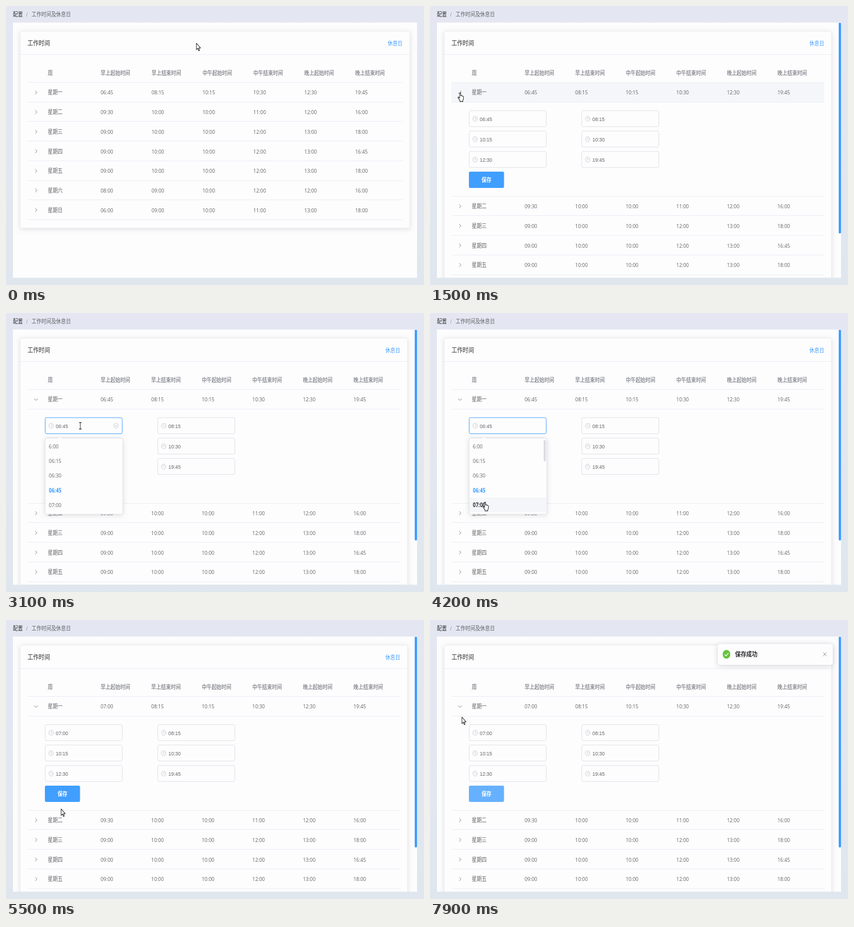
Recreate the animation shown at these times as an HTML page with a canvas. Size 720 by 480 pixels, loop 8000 ms.

```html
<!DOCTYPE html>
<html lang="zh-CN">
<head>
<meta charset="utf-8">
<style>
html, body { margin: 0; width: 100%; height: 100%; overflow: hidden; background: #e2e7f0 }
canvas { display: block }
</style>
</head>
<body>
<canvas id="stage" width="720" height="480"></canvas>
<script>
const ctx = document.getElementById('stage').getContext('2d');
const LOOP = 8000;
// The page is shown at 60.5% width and 70% height, text and cursors included.
const SX = 0.605, SY = 0.7;
const UI = '"Open Sans", "Noto Sans CJK SC", "Noto Sans CJK", sans-serif';
const FIELD = '"Liberation Sans", Arial, sans-serif';
const BLUE = '#409eff', INK = '#606266', DARK = '#303133', GREY = '#909399', PALE = '#c0c4cc';
const WHITE = '#fefdfe', LINE = '#ebeef5', HOVER = '#f4f6fa';

const EXPAND = 1400, OPEN = 2800, PICK = 4450, SAVE = 6600, NOTE = 6900;
const ROW = 33.7, TOP = 131.5, DETAIL = 162;

const heads = ['早上起始时间', '早上结束时间', '中午起始时间', '中午结束时间', '晚上起始时间', '晚上结束时间'];
const days = [
  '一 06:45 08:15 10:15 10:30 12:30 19:45',
  '二 09:30 10:00 10:00 11:00 12:00 16:00',
  '三 09:00 10:00 10:00 12:00 13:00 18:00',
  '四 09:00 10:00 10:00 12:00 13:00 16:45',
  '五 09:00 10:00 10:00 12:00 13:00 18:00',
  '六 08:00 09:00 10:00 12:00 12:00 16:00',
  '日 06:00 09:00 10:00 11:00 13:00 18:00'
].map(s => s.split(' '));
const options = ['6:00', '06:15', '06:30', '06:45', '07:00'];

// time, x, y of the pointer
const path = [
  [0, 328, 64], [100, 328, 64], [1100, 52, 149], [1650, 52, 149], [2600, 128, 194],
  [3200, 128, 194], [4000, 95, 325], [5500, 95, 325], [6300, 99, 300],
  [6750, 99, 300], [7150, 185, 300], [7600, 185, 300], [7900, 55, 167], [LOOP, 55, 167]
];
const arrow = new Path2D('M0 0V16L4 12.6L6.5 18.5L9 17.4L6.6 11.7H11.6Z');
const hand = new Path2D('M5.5 1.5Q7-.5 8.5 1.5V7.5Q10 6 11.2 8Q13 7 14 9Q16 8.5 16.5 10.5V14Q16.5 17 14.5 19V22H6.5V19.5L1 13Q0 10.5 2.5 11L5.5 13.5Z');
const beam = new Path2D('M-3.5-8H-1L0-7L1-8H3.5M0-7V7M-3.5 8H-1L0 7L1 8H3.5');

const clamp = v => Math.max(0, Math.min(1, v));
const smooth = p => p * p * (3 - 2 * p);
const easeOut = p => 1 - Math.pow(1 - clamp(p), 4);
const within = (p, x, y, w, h) => p.x >= x && p.x < x + w && p.y >= y && p.y < y + h;

function pointer(t) {
  const i = path.findIndex(k => k[0] > t);
  const [t0, x0, y0] = path[i - 1], [t1, x1, y1] = path[i];
  const p = smooth((t - t0) / (t1 - t0));
  return { x: x0 + (x1 - x0) * p, y: y0 + (y1 - y0) * p };
}

function text(str, x, y, color, { size = 14, weight = '', font = UI, align = 'left' } = {}) {
  ctx.save();
  ctx.translate(x, y + size * SY * 0.37);
  ctx.scale(SX, SY);
  ctx.font = `${weight} ${size}px ${font}`;
  ctx.textAlign = align;
  ctx.fillStyle = color;
  ctx.fillText(str, 0, 0);
  ctx.restore();
}

function box(x, y, w, h, r, fill, border, shadow) {
  ctx.save();
  ctx.beginPath();
  ctx.roundRect(x, y, w, h, r);
  if (shadow) {
    ctx.shadowColor = `rgba(0,0,0,${shadow})`;
    ctx.shadowBlur = 8;
    ctx.shadowOffsetY = 1.4;
  }
  ctx.fillStyle = fill;
  ctx.fill();
  ctx.shadowColor = 'transparent';
  if (border) {
    ctx.lineWidth = 0.9;
    ctx.strokeStyle = border;
    ctx.stroke();
  }
  ctx.restore();
}

function rect(x, y, w, h, fill) {
  ctx.fillStyle = fill;
  ctx.fillRect(x, y, w, h);
}

function stroke(color, width, ...points) {
  ctx.beginPath();
  points.forEach(([x, y], i) => i ? ctx.lineTo(x, y) : ctx.moveTo(x, y));
  ctx.strokeStyle = color;
  ctx.lineWidth = width;
  ctx.stroke();
}

function ring(x, y, color) {
  ctx.beginPath();
  ctx.ellipse(x, y, 3.7, 4.2, 0, 0, 7);
  ctx.strokeStyle = color;
  ctx.lineWidth = 0.8;
  ctx.stroke();
}

function cross(x, y, rx, ry, color) {
  stroke(color, 0.9, [x - rx, y - ry], [x + rx, y + ry]);
  stroke(color, 0.9, [x - rx, y + ry], [x + rx, y - ry]);
}

function chevron(x, y, turn) {
  ctx.save();
  ctx.translate(x, y);
  ctx.rotate(turn * Math.PI / 2);
  stroke('#7d8087', 0.9, [-1.4, -3.1], [1.5, 0], [-1.4, 3.1]);
  ctx.restore();
}

function field(i, value, focus, m) {
  const x = i % 2 ? 261.5 : 67.5, y = 180 + 35.1 * (i >> 1);
  const over = within(m, x, y, 133, 28);
  box(x, y, 132.7, 27.7, 2.5, WHITE, focus ? BLUE : over ? PALE : '#dcdfe6');
  ring(x + 10.2, y + 14, PALE);
  stroke(PALE, 0.8, [x + 10.2, y + 11.4], [x + 10.2, y + 14.4], [x + 12.2, y + 14.4]);
  text(value, x + 18.3, y + 14, INK, { font: FIELD });
  if (over && i === 0) {
    ring(x + 122, y + 14, PALE);
    cross(x + 122, y + 14, 1.3, 1.5, PALE);
  }
}

function detail(t, m, values) {
  values.forEach((v, i) => field(i, v, i === 0 && t >= OPEN && t < PICK, m));
  const lit = t >= SAVE || within(m, 67, 285, 60.5, 28);
  box(67, 285, 60.5, 28, 2.3, lit ? '#66b1ff' : BLUE);
  text('保存', 97.3, 299, '#fff', { weight: 'bold', align: 'center' });
}

function table(t, m, expanded, right) {
  const step = expanded ? 87.1 : 87.7;
  const colX = i => 163 + step * i;
  text('周', 72, 115, GREY, { weight: 'bold' });
  heads.forEach((h, i) => text(h, colX(i), 115, GREY, { weight: 'bold' }));
  rect(37, 131, right - 37, 1, LINE);
  days.forEach(([day, ...times], r) => {
    const y = TOP + ROW * r + (expanded && r ? DETAIL : 0);
    if (t >= PICK && r === 0) times[0] = '07:00';
    const covered = t >= OPEN && t < PICK;
    if (!covered && within(m, 37, y, right - 37, ROW)) rect(37, y, right - 37, ROW, HOVER);
    const mid = y + 17.3;
    chevron(51.8, mid, r ? 0 : smooth(clamp((t - EXPAND) / 200)));
    text('星期' + day, 72, mid, INK);
    times.forEach((v, i) => text(v, colX(i), mid, INK));
    rect(37, Math.floor(y + ROW), right - 37, 1, LINE);
    if (expanded && r === 0) {
      rect(37, 327, right - 37, 1, LINE);
      detail(t, m, times);
    }
  });
}

function dropdown(t, m) {
  const shown = t < PICK ? easeOut((t - OPEN) / 300) : 1 - easeOut((t - PICK) / 300);
  if (t < OPEN || shown <= 0.002) return;
  ctx.save();
  ctx.globalAlpha = shown;
  ctx.translate(0, 215.5);
  ctx.scale(1, shown);
  ctx.translate(0, -215.5);
  box(67.5, 215.5, 133.5, 130.5, 2.5, WHITE, '#e4e7ed', 0.14);
  ctx.beginPath();
  ctx.moveTo(88.5, 216.2);
  ctx.lineTo(92.5, 212);
  ctx.lineTo(96.5, 216.2);
  ctx.fillStyle = WHITE;
  ctx.fill();
  stroke('#e4e7ed', 0.7, [88.5, 215.5], [92.5, 212], [96.5, 215.5]);
  options.forEach((o, i) => {
    const y = 216.7 + 25.2 * i;
    const over = within(m, 68, y, 133, 25.2);
    const selected = o === (t < PICK ? '06:45' : '07:00');
    if (over) rect(68, y, 132.5, 25.2, HOVER);
    text(o, 73.8, y + 12.6, selected ? BLUE : over ? DARK : INK, { weight: selected || over ? 'bold' : '' });
  });
  if (within(m, 68, 216, 133, 130)) box(195.8, 218.5, 3.7, 37, 1.8, '#dcdde0');
  ctx.restore();
}

function notice(t) {
  if (t < NOTE) return;
  ctx.save();
  ctx.translate(225 * (1 - easeOut((t - NOTE) / 300)), 0);
  box(495.5, 41, 198.5, 36.3, 4, WHITE, LINE, 0.16);
  ctx.beginPath();
  ctx.ellipse(510.7, 59, 6.6, 7.4, 0, 0, 7);
  ctx.fillStyle = '#67c23a';
  ctx.fill();
  stroke('#fff', 1.3, [507.6, 59.2], [509.9, 61.8], [514, 56.8]);
  text('保存成功', 525.5, 59, DARK, { size: 16, weight: 'bold' });
  cross(680, 59, 2.9, 3.3, GREY);
  ctx.restore();
}

function cursor(t, m) {
  const listOpen = t >= OPEN && t < PICK;
  const overField = [0, 1, 2, 3, 4, 5].some(i =>
    within(m, i % 2 ? 261 : 67, 180 + 35.1 * (i >> 1), 133, 28));
  const overHand = within(m, 67, 285, 60.5, 28) || within(m, 46, 142, 12, 14) ||
    (listOpen && within(m, 67, 215, 134, 131));
  ctx.save();
  ctx.translate(m.x, m.y);
  ctx.scale(SX, SY);
  ctx.lineJoin = 'round';
  ctx.lineWidth = 1.5;
  ctx.strokeStyle = '#222';
  ctx.fillStyle = '#fff';
  if (overHand) {
    ctx.translate(-7, 0);
    ctx.fill(hand);
    ctx.stroke(hand);
  } else if (overField && t > EXPAND) {
    ctx.stroke(beam);
  } else {
    ctx.fill(arrow);
    ctx.stroke(arrow);
  }
  ctx.restore();
}

function draw(t) {
  const m = pointer(t), expanded = t >= EXPAND;
  const cardRight = expanded ? 691.5 : 695.5, right = cardRight - 12.5;

  const bg = ctx.createLinearGradient(0, 0, 0, 480);
  bg.addColorStop(0, '#e4e7f2');
  bg.addColorStop(1, '#e0e6ee');
  rect(0, 0, 720, 480, bg);
  text('配置', 12, 14, DARK, { weight: '500' });
  text('/', 34.5, 14, GREY);
  text('工作时间及休息日', 44, 14, INK);

  ctx.save();
  ctx.beginPath();
  ctx.rect(12, 28.5, 696, 439);
  ctx.clip();
  rect(12, 28, 696, 440, WHITE);
  box(24.5, 43.5, cardRight - 24.5, 338.5 + (expanded ? DETAIL : 0), 2.5, WHITE, LINE, 0.13);
  text('工作时间', 37, 64, DARK, { size: 16 });
  text('休息日', right, 64, BLUE, { align: 'right' });
  rect(25, 83, cardRight - 25, 1, LINE);
  table(t, m, expanded, right);
  if (expanded) box(704, 28.5, 4, 363, 2, BLUE);
  ctx.restore();

  dropdown(t, m);
  notice(t);
  cursor(t, m);
}

const start = performance.now();
function tick() {
  draw((performance.now() - start) % LOOP);
  requestAnimationFrame(tick);
}
tick();
</script>
</body>
</html>
```
